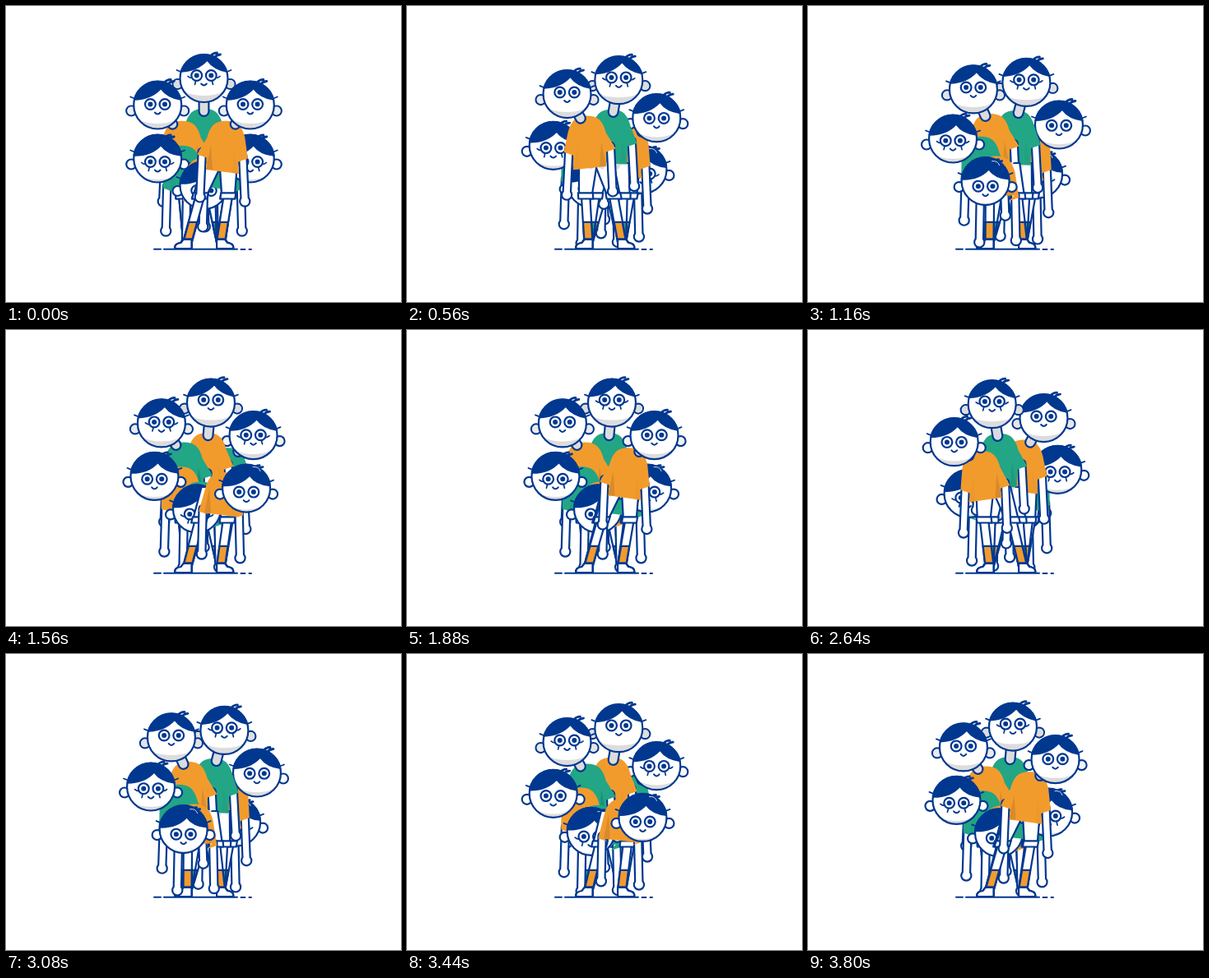
An HTML page that plays this animation: 480x360 px, repeating every 3.84 s.

```html
<!DOCTYPE html>
<html lang="en">
<head>
<meta charset="utf-8">
<title>Circling group</title>
<style>
html, body { margin: 0; width: 100%; height: 100%; overflow: hidden; background: #fff; }
svg { display: block; width: 480px; height: 360px; }
</style>
</head>
<body>
<svg viewBox="0 0 480 360" fill="none" stroke-linecap="round" stroke-linejoin="round">
  <path d="M180 295.8H188M192 295.8H281M285.5 296H290.5M295.5 296H298" stroke="#003890" stroke-width="2"/>
  <g id="crew"></g>
</svg>
<script>
const INK = '#003890', GREY = '#dcdcde';
const KITS = [
  { shirt: '#22a685', fold: '#1c9075', lashes: true },
  { shirt: '#f29b2d', fold: '#d98a2b', lashes: false }
];
const LAP = 1920, COUNT = 6, STEP = 40, CX = 240.5, CY = 153, R = 29;
const crew = document.getElementById('crew');

const n = v => Math.round(v * 100) / 100;
const P = (x, y) => n(x) + ' ' + n(y);
const path = (d, fill = 'none', line = 2.2, more = '') =>
  `<path d="${d}" fill="${fill}"${line ? ` stroke="${INK}" stroke-width="${line}"` : ''} ${more}/>`;
const dot = (x, y, r, fill, line = 0, more = '') =>
  `<circle cx="${n(x)}" cy="${n(y)}" r="${r}" fill="${fill}"${line ? ` stroke="${INK}" stroke-width="${line}"` : ''} ${more}/>`;
const stroke = (d, width, color) => `<path d="${d}" stroke="${color}" stroke-width="${width}"/>`;
const tube = (d, width, color) => stroke(d, width, INK) + stroke(d, width - 4.4, color);

function leg(side, hip, kit) {
  const ax = CX + 0.3 + side * 20.3, ay = 287;
  const hx = hip + side * 15, hy = 198;
  const at = (k, off = 0) => P(ax + (hx - ax) * k + off, ay + (hy - ay) * k);
  const toe = x => n(ax + side * x);
  const shoe = `M${toe(-5)} 284V295H${toe(15)}Q${toe(16)} 289 ${toe(8)} 288L${toe(5)} 284Z`;
  return tube(`M${at(0)}L${at(0.6)}`, 12.5, '#fff') +
    path(`M${at(0.04, -5)}L${at(0.27, -5)}L${at(0.27, 5)}L${at(0.04, 5)}Z`, kit.shirt) +
    path(shoe, '#fff') +
    path(`M${at(0.65, side * 8)}L${P(hip + side * 21, 191)}H${n(hip)}V197L${at(0.65, -side * 8)}Z`, '#fff') +
    path(`M${at(0.59, -9)}L${at(0.67, -9)}L${at(0.67, 9)}L${at(0.59, 9)}Z`, '#fff');
}

function arm(x, y, hx, hy) {
  const d = `M${P(x, y)}L${P(hx, hy)}`;
  return stroke(d, 11.5, INK) + dot(hx, hy, 6.1, '#fff', 2.2) + stroke(d, 7.1, '#fff');
}

function head(x, y, low, kit) {
  const eye = 1.5 + 5 * low, part = -18 + 4 * low, end = -5 + 3 * low;
  const ex = Math.sqrt(R * R - end * end);
  const chin = 12, cx = Math.sqrt(R * R - chin * chin);
  const tuftY = -27 + 5 * Math.max(0, low);
  let g = '';
  for (const s of [-1, 1]) {
    g += dot(s * 32, 7, 6, '#fff', 2.2);
    g += dot(s * 32, 7, 4.9, GREY, 0, `fill-opacity="${n(Math.max(0, -low))}"`);
  }
  g += dot(0, 0, R, '#fff');
  g += path(`M${P(-cx, chin)}A${R} ${R} 0 0 0 ${P(cx, chin)}A${P(cx, 12 + 3 * low)} 0 0 1 ${P(-cx, chin)}Z`, GREY, 0);
  g += dot(0, 0, R, 'none', 2.2);
  g += path(`M${P(-ex, end)}A${R} ${R} 0 0 1 ${P(ex, end)}Q${P(12, part + 11)} ${P(4, part)}Q${P(-8, part + 13)} ${P(-ex, end)}Z`, INK, 1.6);
  g += path('M-28 -8l-5 -2M28 -8l5 -2', 'none', 1.8);
  g += path(`M8 ${n(tuftY)}q3 -4 8 -4M12 ${n(tuftY + 2)}q4 -4 8 -4`, 'none', 2.8);
  if (low > 0.6) g += stroke(`M8 ${n(tuftY - 2)}q7 -1 9 5`, 0.8, '#fff');
  for (const s of [-1, 1]) {
    g += dot(s * 8.8, eye, 6.4, '#fff', 2.2) + dot(s * 8.8, eye, 3, INK);
    if (kit.lashes) {
      g += path(`M${P(s * 14.5, eye + 3)}q${s * 3} 0 ${s * 5} -2M${P(s * 10, eye + 7)}l${s} 4`, 'none', 1.7);
    }
  }
  g += path(`M-3.3 ${n(eye + 10)}q3.3 4 6.6 0`, 'none', 2);
  return `<g transform="translate(${P(x, y)})">${g}</g>`;
}

function person(u, kit) {
  const a = u / LAP * 2 * Math.PI, s = -Math.sin(a), c = Math.cos(a);
  const hx = CX + 65 * s, hy = CY - 65 * c;
  const bx = CX + 31 * s, by = 182 - 30 * c;
  const hip = CX + 3 + 19 * s;

  // hands, sleeve ends and hem
  const mid = CX + 26 * s, half = 25.5 + 3.5 * c, tilt = 3 * s;
  const handY = 253 - 36 * c, cuffY = handY - 50;
  const lx = mid - half, rx = mid + half;
  const ly = cuffY - tilt, ry = cuffY + tilt;
  const hem = 212 - 21 * c, hemL = hem - tilt, hemR = hem + tilt;
  const inset = 2 + c;

  let g = leg(-1, hip, kit) + leg(1, hip, kit);
  g += path(`M${P(hip - 4, 190)}H${n(hip + 4)}L${P(hip, 196)}Z`, '#fff', 0);
  g += path(`M${P(hip - 14, 190)}H${n(hip + 14)}L${P(hip + 8, 199)}L${P(hip, 195)}L${P(hip - 7, 199)}Z`, GREY, 0);
  g += arm(lx + inset, ly - 5, lx, handY - tilt);
  g += arm(rx - inset, ry - 5, rx, handY + tilt);

  g += path(`M${P(lx - 3.5, ly - 2)}L${P(bx - 23, by - 7)}Q${P(bx - 19, by - 23)} ${P(bx - 9, by - 26)}` +
    `Q${P(bx, by - 28.5)} ${P(bx + 9, by - 26)}Q${P(bx + 19, by - 23)} ${P(bx + 23, by - 7)}` +
    `L${P(rx + 3.5, ry - 2)}L${P(rx - 8, ry + 2)}L${P(mid + 20, hemR)}` +
    `L${P(mid - 20, hemL)}L${P(lx + 8, ly + 2)}Z`, kit.shirt, 0);

  const fold = (y, side, alpha) => path(
    `M${P(mid + side * 20, y)}L${P(mid + side * 14, y - 30)}L${P(mid + side * 12, y)}Z`,
    kit.fold, 0, `fill-opacity="${n(Math.min(1, Math.max(0.2, alpha)))}"`);
  g += fold(hemL, -1, s + 0.3) + fold(hemR, 1, 0.3 - s);

  const dx = bx - 8 * s - hx, dy = by - hy, len = Math.hypot(dx, dy);
  const reach = Math.max(0, 19 + 21 * c);
  g += tube(`M${P(hx, hy)}L${P(hx + dx / len * reach, hy + dy / len * reach)}`, 14, GREY);
  return g + head(hx, hy, -c, kit);
}

function draw(t) {
  let out = '';
  for (let i = 0; i < COUNT; i++) out += person((t + i * LAP / COUNT) % LAP, KITS[i % 2]);
  crew.innerHTML = out;
}

const start = performance.now();
let last = -1;
function tick() {
  const t = Math.floor((performance.now() - start) / STEP) * STEP % (2 * LAP);
  if (t !== last) draw(last = t);
  requestAnimationFrame(tick);
}
tick();
</script>
</body>
</html>
```
